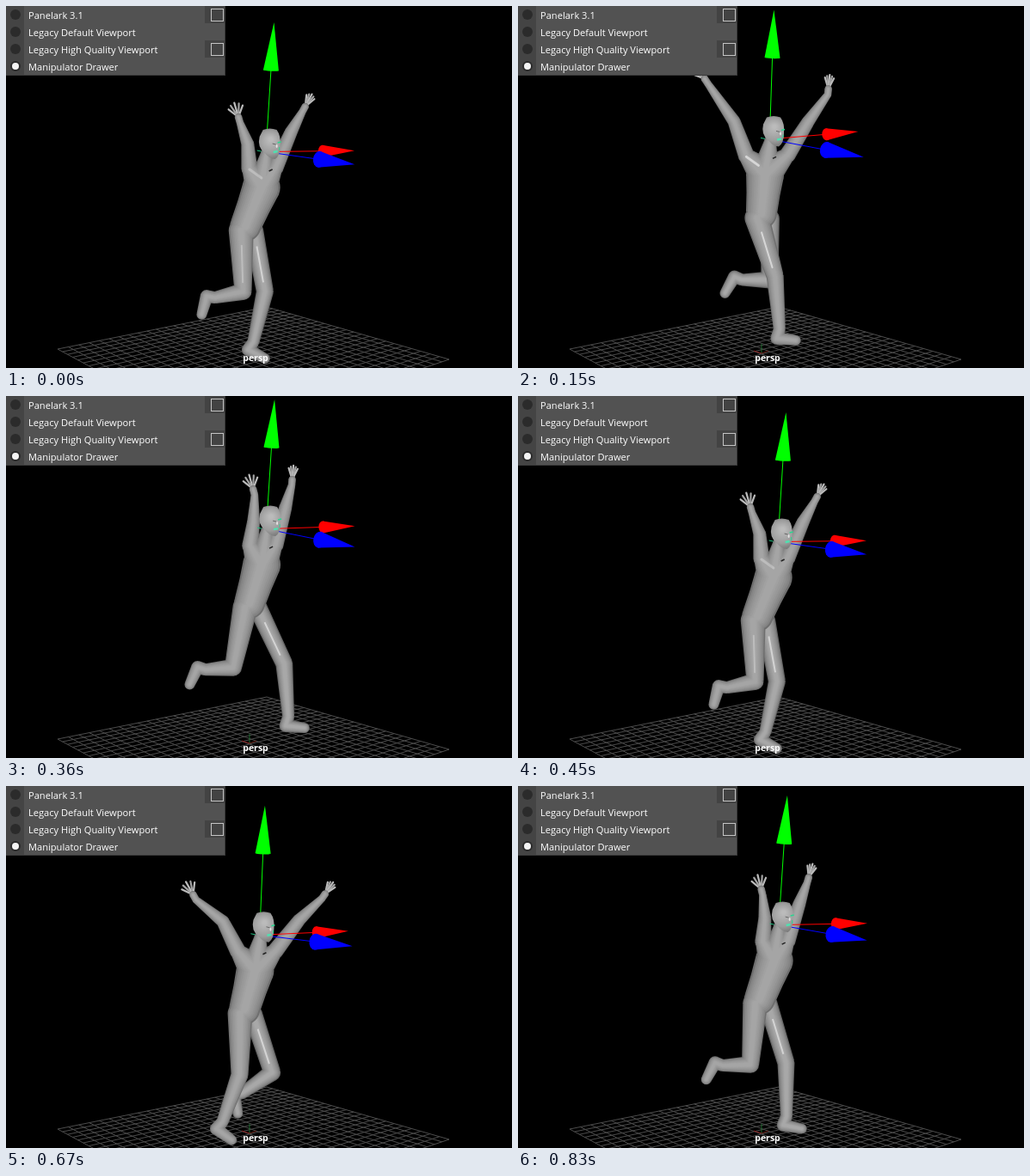
An HTML page with a canvas for the animation above (0.87 s loop, 588 by 421 pixels).

```html
<!DOCTYPE html>
<html>
<head>
<meta charset="utf-8">
<style>
  html, body { margin: 0; height: 100%; overflow: hidden; background: #000; }
  canvas { display: block; }
</style>
</head>
<body>
<canvas id="stage" width="588" height="421"></canvas>
<script>
const ctx = document.getElementById('stage').getContext('2d');
const LOOP = 870, CYCLE = 430, FIRST = 30, STEP = 40, FAR_LAG = 228;

const wave = (t, peak, period = CYCLE) => Math.cos(2 * Math.PI * (t - peak) / period);
const mix = (a, b, k) => a + (b - a) * k;
const mixPoint = (a, b, k) => [mix(a[0], b[0], k), mix(a[1], b[1], k)];
const shift = ([x, y], dx, dy) => [x + dx, y + dy];
const white = alpha => `rgba(255,255,255,${alpha})`;

// Moves a point by a length; the angle leans right from straight up or down.
function reach([x, y], degrees, length, vertical) {
  const a = degrees * Math.PI / 180;
  return [x + Math.sin(a) * length, y + vertical * Math.cos(a) * length];
}
const up = (p, degrees, length) => reach(p, degrees, length, -1);
const down = (p, degrees, length) => reach(p, degrees, length, 1);

function line(a, b, color, width = 1) {
  ctx.strokeStyle = color;
  ctx.lineWidth = width;
  ctx.beginPath();
  ctx.moveTo(...a);
  ctx.lineTo(...b);
  ctx.stroke();
}

function disc(x, y, rx, ry, color) {
  ctx.fillStyle = color;
  ctx.beginPath();
  ctx.ellipse(x, y, rx, ry, 0, 0, 7);
  ctx.fill();
}

// Adds a chain of tapered capsules [x, y, radius] to the path.
function tube(points, scale) {
  points.forEach(([x, y, r], i) => {
    r *= scale;
    ctx.moveTo(x + r, y);
    ctx.arc(x, y, r, 0, 2 * Math.PI);
    if (!i) return;
    const [px, py, pr] = points[i - 1];
    const d = Math.hypot(x - px, y - py) || 1;
    const nx = (y - py) / d, ny = (px - x) / d, q = pr * scale;
    ctx.moveTo(px + nx * q, py + ny * q);
    ctx.lineTo(x + nx * r, y + ny * r);
    ctx.lineTo(x - nx * r, y - ny * r);
    ctx.lineTo(px - nx * q, py - ny * q);
    ctx.closePath();
  });
}

// Round shading: smaller, lighter copies on top of each other.
function shaded(tubes, dark, light) {
  for (let k = 0; k < 8; k++) {
    const g = mix(dark, light, Math.sqrt(k / 7));
    ctx.fillStyle = `rgb(${g},${g},${g})`;
    ctx.beginPath();
    tubes.forEach(t => tube(t, 1 - k * 0.11));
    ctx.fill();
  }
}

const chain = (points, radii) => points.map((p, i) => [...p, radii[i]]);

// Both legs run the same motion; the shin shortens as it folds back.
function leg(hip, t, turn, hipRadius) {
  const shin = -42 + 48 * wave(t, 165), foot = 1.2 * shin + 78;
  const knee = down(hip, 3.5 + turn + 15.5 * wave(t, 115), 71);
  const ankle = down(knee, shin, 32 + 30 * Math.cos(shin * Math.PI / 180) ** 2);
  const heel = down(down(ankle, shin, 11), foot, -4);
  const toe = down(heel, foot, 22);
  return chain([hip, knee, ankle, heel, toe], [hipRadius, 10, 7, 7.5, 6]);
}

// Each part is [angle, length]: upper arm, forearm, hand.
function arm(shoulder, upper, fore, hand, spread) {
  const elbow = up(shoulder, ...upper), wrist = up(elbow, ...fore);
  const [angle, length] = hand, palm = up(wrist, angle, length * 0.3);
  ctx.lineCap = 'round';
  for (let f = -2; f <= 2; f++) {
    line(palm, up(palm, angle + f * spread, length * (0.75 - 0.06 * Math.abs(f))), f % 2 ? '#a4a4a4' : '#bbb', 2.2);
  }
  ctx.lineCap = 'butt';
  return chain([shoulder, elbow, wrist, palm], [9.5, 7.5, 4.3, 4.3]);
}

function arrow(from, tip, color, at, radius, squash) {
  const base = mixPoint(from, tip, at);
  line(from, base, color);
  const angle = Math.atan2(tip[1] - from[1], tip[0] - from[0]);
  const nx = -Math.sin(angle) * radius, ny = Math.cos(angle) * radius;
  ctx.fillStyle = color;
  ctx.beginPath();
  ctx.ellipse(...base, squash, radius, angle, 0, 7);
  ctx.fill();
  ctx.beginPath();
  ctx.moveTo(base[0] + nx, base[1] + ny);
  ctx.lineTo(...tip);
  ctx.lineTo(base[0] - nx, base[1] - ny);
  ctx.fill();
}

// Ground plane in perspective, u and v from -1 to 1.
function ground(u, v) {
  const a = (u + v) / 2, b = (u - v) / 2, wa = -0.02, wb = 0.27;
  const project = (left, right, back) => {
    const o = (right * (1 + wa) + left * (1 - wa)) / 2;
    const da = right * (1 + wa) - o, db = back * (1 + wb) - o;
    return (o + a * da + b * db) / (1 + a * wa + b * wb);
  };
  return [project(60, 515, 303), project(399, 411, 350)];
}

function drawGrid() {
  for (let k = -1; k < 1.01; k += 1 / 12) {
    line(ground(k, -1), ground(k, 1), '#4c4c4c');
    line(ground(-1, k), ground(1, k), '#4c4c4c');
  }
  line([283, 404], [283, 393], '#1c6a2c');
  line([283, 404], [274, 401], '#8a2020');
  line([283, 404], [291, 401], '#6a2418');
}

function drawHead([x, y]) {
  const g = ctx.createRadialGradient(x + 1, y - 5, 2, x, y, 21);
  g.addColorStop(0, '#bbb');
  g.addColorStop(0.6, '#9c9c9c');
  g.addColorStop(1, '#6c6c6c');
  ctx.fillStyle = g;
  ctx.beginPath();
  ctx.moveTo(x - 8, y - 16);
  ctx.quadraticCurveTo(x, y - 19, x + 8, y - 16);
  ctx.quadraticCurveTo(x + 13, y - 9, x + 12, y + 2);
  ctx.quadraticCurveTo(x + 12, y + 14, x + 6, y + 18);
  ctx.quadraticCurveTo(x, y + 18, x - 6, y + 11);
  ctx.quadraticCurveTo(x - 15, y + 4, x - 12, y - 8);
  ctx.closePath();
  ctx.fill();
  line([x + 3, y], [x + 7, y + 1], '#666');
  disc(x + 8, y + 3, 1, 2, '#e4e4e4');
  line([x + 4, y + 10], [x + 9, y + 9], '#4fe0b0', 2.5);
  line([x + 9, y - 1], [x + 13, y - 2], '#28d890', 1.5);
  line([x + 11, y + 4], [x + 11, y + 8], '#28d890');
  line([x - 15, y + 8], [x - 10, y + 9], '#20c080');
  line([x - 1, y + 32], [x + 3, y + 30], '#222', 1.5);
}

function drawFigure(t) {
  // The body sways once and bounces twice per cycle.
  const sway = wave(t, 385), bounce = wave(t, 140, CYCLE / 2);
  const head = [302.3 + 5.5 * sway, 154.5 - 9.5 * bounce];
  const chest = shift(head, -10, 51);
  const pelvis = [280 + 3 * bounce, head[1] + 96];
  const nearShoulder = [275 + 10 * sway, head[1] + 29];
  const farShoulder = [313, head[1] + 28];

  const farLeg = leg(shift(pelvis, 10, 6), t + FAR_LAG, 8, 11);
  const nearLeg = leg(shift(pelvis, -5, 5), t, 0, 14.5);
  const shine = ([hip, knee], alpha) =>
    line(mixPoint(hip, knee, 0.25), mixPoint(hip, knee, 0.85), white(alpha), 2);

  shaded([farLeg], 100, 168);
  shine(farLeg, 0.5);

  const nearArm = arm(nearShoulder,
    [-12 + 15 * sway + 7 * bounce, 35 - 8 * sway],
    [-28 + 20 * sway + 13 * bounce, 38 - 12 * sway + 4 * bounce],
    [-24 + 10 * sway, 23], 18);
  const farArm = arm(farShoulder,
    [28 - 9 * sway - 5 * bounce, 45],
    [33 - 11 * sway - 8 * bounce, 33 - 7 * sway],
    [20 - 15 * bounce, 22], 11);
  shaded([
    chain([shift(head, -4, 12), chest], [7, 17]),
    chain([nearShoulder, chest, farShoulder], [9.5, 20, 9]),
    chain([chest, mixPoint(chest, pelvis, 0.5), pelvis], [22, 19.5, 18]),
    nearArm, farArm, nearLeg
  ], 110, 165);

  const lean = Math.max(0, -sway * bounce);
  ctx.lineCap = 'round';
  shine(nearLeg, 0.6 * lean);
  line(shift(nearShoulder, 0, 1), shift(nearShoulder, 14, 11), white(0.6 * lean), 3);
  ctx.lineCap = 'butt';

  const pivot = shift(head, -4.7, 9.5);
  arrow(pivot, shift(pivot, 7.5 + 2.5 * sway, -150.5), '#0f0', 0.63, 9, 1);
  arrow(pivot, shift(pivot, 103, -4.5 + 3 * sway - 1.5 * bounce), '#f00', 0.64, 7, 5);
  arrow(pivot, shift(pivot, 106 - 3.5 * sway, 17 + 4 * bounce), '#00f', 0.6, 9.5, 7);
  drawHead(head);
}

function drawPanel() {
  const box = (x, y, w, h, color) => { ctx.fillStyle = color; ctx.fillRect(x, y, w, h); };
  box(0, 0, 255, 81, '#3a3a3a');
  box(0, 0, 254, 80, '#525252');
  box(0, 0, 21, 80, '#444');
  ctx.font = '11.1px "Open Sans", "Noto Sans", sans-serif';
  ctx.textAlign = 'left';
  ['Panelark 3.1', 'Legacy Default Viewport', 'Legacy High Quality Viewport', 'Manipulator Drawer']
    .forEach((label, i) => {
      const y = 10 + i * 20;
      disc(11, y, 6, 6, '#2b2b2b');
      if (i === 3) disc(11, y, 4, 4, '#f4f4f4');
      if (i % 2 === 0) {
        box(231, y - 10, 23, 20, '#434343');
        ctx.strokeStyle = '#c4c4c4';
        ctx.lineWidth = 1;
        ctx.strokeRect(238.5, y - 6.5, 14, 14);
      }
      ctx.fillStyle = '#fff';
      ctx.fillText(label, 26, y + 5);
    });
}

function draw(now) {
  const t = now % LOOP;
  const pose = t < FIRST ? 0 : FIRST + Math.floor((t - FIRST) / STEP) * STEP;
  ctx.fillStyle = '#000';
  ctx.fillRect(0, 0, 588, 421);
  drawGrid();
  drawFigure(pose);
  drawPanel();
  ctx.font = 'bold 10.5px "Open Sans", "Noto Sans", sans-serif';
  ctx.textAlign = 'center';
  ctx.fillStyle = '#fff';
  ctx.fillText('persp', 290, 413);
}

const begin = performance.now();
(function frame() {
  draw(performance.now() - begin);
  requestAnimationFrame(frame);
})();
</script>
</body>
</html>
```
